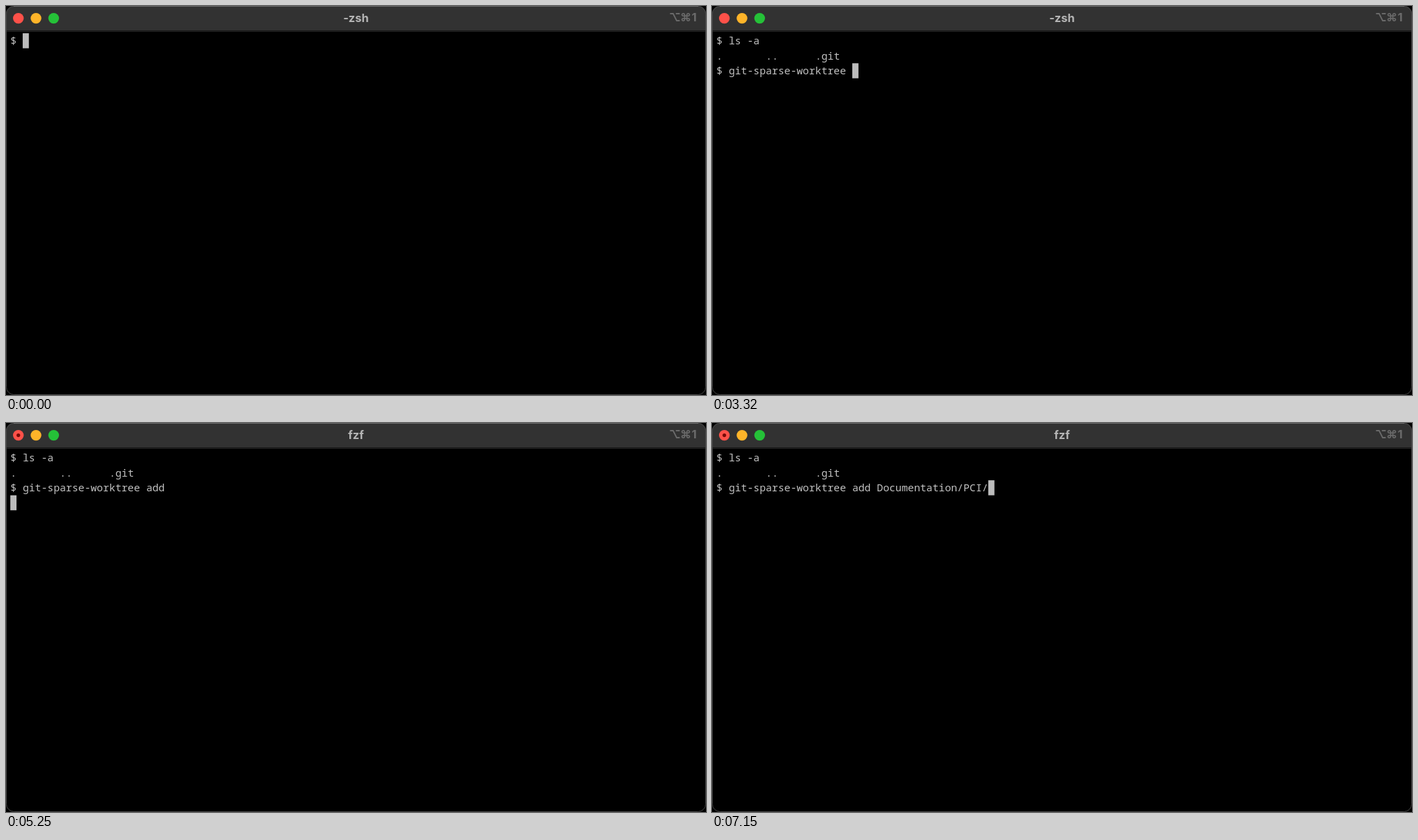
These frames come from a looping animation (1003x558 px, 8000 ms). An HTML page:

```html
<!DOCTYPE html>
<html lang="en">
<head>
<meta charset="utf-8">
<title>Terminal</title>
<style>
  html, body { margin: 0; width: 100%; height: 100%; overflow: hidden; background: #000; }
  svg { display: block; width: 1003px; height: 558px; }
  .bar { font: 700 16.5px Inter, "DejaVu Sans", sans-serif; text-anchor: middle; }
  #term text { font: 14.75px "Noto Sans Mono", "DejaVu Sans Mono", monospace; white-space: pre; fill: #c2c2c2; }
  #term .bold { font-weight: 700; fill: #fff; }
  #term .match { fill: #d9d9d9; }
  #term .hit { font-weight: 700; fill: #a5d3a8; }
  #term .info { fill: #a2a27e; }
  #term .prompt { font-weight: 700; fill: #92979c; }
  #term .pointer { font-weight: 700; fill: #cf2630; }
</style>
</head>
<body>
<svg viewBox="0 0 1003 558">
  <rect width="1003" height="558" fill="#000"/>
  <path d="M0 36V11A11 11 0 0 1 11 0H992A11 11 0 0 1 1003 11V36Z" fill="#323232"/>
  <rect y="35" width="1003" height="1" fill="#151515"/>
  <rect y="36" width="1003" height="1" fill="#222"/>
  <rect x=".5" y=".5" width="1002" height="557" rx="11" fill="none" stroke="#464646"/>
  <path d="M11 .5H992" stroke="#6c6c6c"/>
  <circle cx="17.7" cy="17.6" r="7.7" fill="#fe5149"/>
  <circle id="dot" cx="17.7" cy="17.6" r="2.6" fill="#760a07"/>
  <circle cx="43" cy="17.6" r="7.7" fill="#feb429"/>
  <circle cx="68.3" cy="17.6" r="7.7" fill="#25c138"/>
  <text id="title" class="bar" x="501.5" y="23" fill="#b5b5b5"></text>
  <g class="bar" fill="#6b6b6b">
    <text x="958.5" y="22">⌥</text>
    <text x="974" y="22">⌘</text>
    <text x="986" y="22">1</text>
  </g>
  <g id="term"></g>
</svg>
<script>
const LOOP = 8000, CELL = 8.855, ROW = 21.53, LEFT = 6.2, TOP = 39.1;
const $ = id => document.getElementById(id);

const rootFiles = ('.clang-format .cocciconfig .editorconfig .get_maintainer.ignore .gitattributes ' +
  '.gitignore .mailmap .rustfmt.toml COPYING CREDITS Documentation/ Kbuild Kconfig LICENSES/').split(' ');
const docFiles = ('.gitignore ABI/ Changes CodingStyle Kconfig Makefile PCI/ RCU/ SubmittingPatches ' +
  'accel/ accounting/ admin-guide/ arch/ atomic_bitops.txt').split(' ');
const root = { query: '', total: 39, files: rootFiles, thumb: 5 };
const docs = { query: 'Documentation/', total: 87, files: docFiles, thumb: 2 };

// Timeline: each step changes part of the previous state.
const steps = [];
let last = { first: '', listed: false, cmd: '', cursor: [2, 0], title: '-zsh', list: null, pick: 0 };
const at = (time, change) => steps.push({ time, state: last = { ...last, ...change } });
const typeFirst = (time, first) => at(time, { first, cursor: [2 + first.length, 0] });
const type = (time, cmd) => at(time, { cmd, list: null, cursor: [2 + cmd.length, 2] });
const open = (time, list) => at(time, { list, pick: 0, cursor: [2 + list.query.length, 3] });
const move = (time, pick) => at(time, { pick });

typeFirst(0, '');
typeFirst(200, 'l');
typeFirst(400, 'ls');
typeFirst(500, 'ls -');
typeFirst(670, 'ls -a');
at(1150, { cursor: [0, 1] });
at(1250, { listed: true, cursor: [2, 2] });
type(2280, 'g');
type(2600, 'gi');
type(2700, 'git');
type(2900, 'git-');
type(3000, 'git-s');
type(3100, 'git-sp');
type(3320, 'git-sparse-worktree ');
type(3670, 'git-sparse-worktree add ');

at(4280, { cursor: [0, 3] });
open(4380, root);
move(4480, 1);
at(4580, { pick: 2, title: 'fzf' });
move(4680, 4);
move(4850, 5);
move(4950, 7);
move(5050, 9);
move(5150, 10);
at(5250, { list: null, cursor: [0, 3] });
type(5350, 'git-sparse-worktree add Documentation/');

at(5670, { cursor: [0, 3] });
open(5770, docs);
move(5870, 1);
at(5970, { title: '-zsh' });
move(6070, 2);
move(6170, 3);
move(6270, 4);
move(6430, 5);
at(6530, { title: 'fzf' });
move(6630, 6);
at(6730, { list: null, cursor: [0, 3] });
at(6830, { cursor: null });
type(7150, 'git-sparse-worktree add Documentation/PCI/');

const px = col => LEFT + col * CELL;
const py = row => TOP + row * ROW;
const rect = (x, y, w, h, fill) =>
  `<rect x="${x}" y="${y}" width="${w}" height="${h}" fill="${fill}"/>`;
const text = (col, row, str, cls = '') =>
  `<text class="${cls}" x="${px(col)}" y="${py(row) + 16.3}">${str.replace(/>/g, '&gt;')}</text>`;

function drawList({ query, total, files, thumb }, pick) {
  let out = text(0, 3, '>', 'prompt') + text(2, 3, query, 'bold');
  out += text(2, 4, `${total}/${total} (0)`, 'info');
  out += rect(112.5, 136.5, 877.5, 1, '#717168');
  out += rect(px(0), py(5), CELL, files.length * ROW, '#282526');
  files.forEach((name, i) => {
    const row = 5 + i, on = i === pick;
    if (on) {
      out += rect(px(0), py(row), (2 + query.length + name.length) * CELL, ROW, '#282828');
      out += text(0, row, '>', 'pointer');
    }
    if (query) out += text(2, row, query, on ? 'hit' : 'match');
    out += text(2 + query.length, row, name, on ? 'bold' : '');
  });
  return out + rect(994, py(5), 1.5, thumb * ROW, '#707070');
}

function draw(s) {
  $('title').textContent = s.title;
  $('dot').style.display = s.title === 'fzf' ? '' : 'none';
  let out = text(0, 0, '$ ' + s.first);
  if (s.listed) {
    out += text(0, 1, '.') + text(8, 1, '..') + text(16, 1, '.git');
    out += text(0, 2, '$ ' + s.cmd);
  }
  if (s.list) out += drawList(s.list, s.pick);
  if (s.cursor) {
    const [col, row] = s.cursor;
    out += rect(px(col), py(row), CELL, ROW, '#bcbcbc');
  }
  $('term').innerHTML = out;
}

let shown;
function tick() {
  const time = performance.now() % LOOP;
  const { state } = steps.findLast(step => step.time <= time);
  if (state !== shown) draw(shown = state);
  requestAnimationFrame(tick);
}
tick();
</script>
</body>
</html>
```
